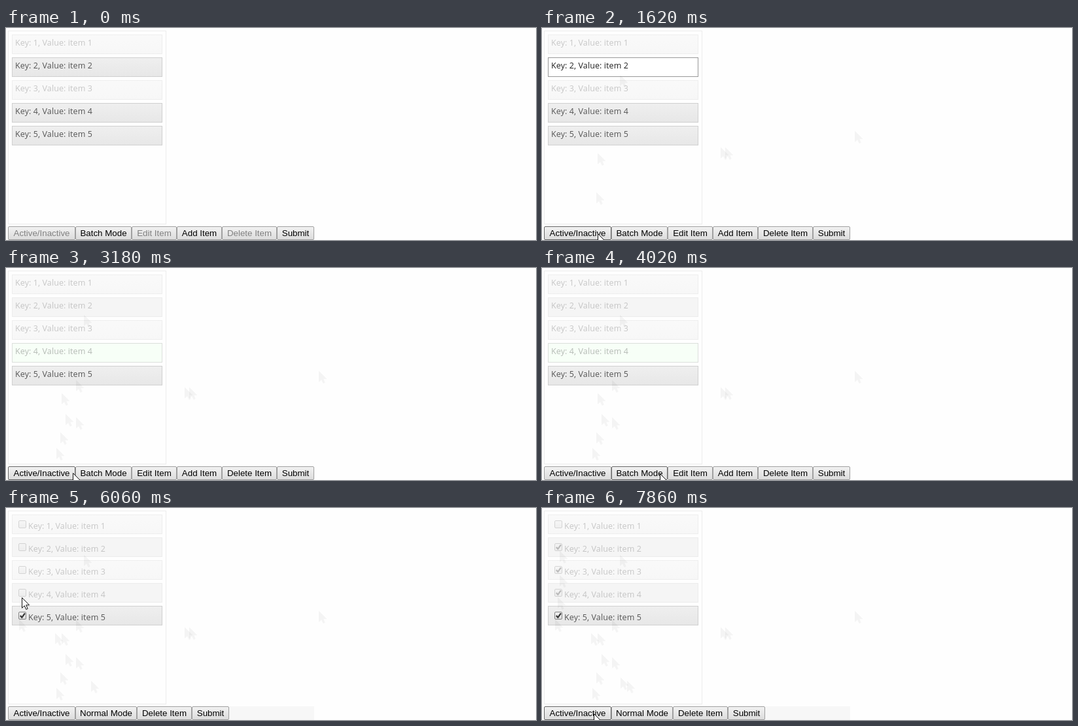
Animation, 810 px wide and 325 px high, one loop 8000 ms. Source, as an HTML page:

```html
<!DOCTYPE html>
<html lang="en">
<head>
<meta charset="utf-8">
<title>Item list</title>
<style>
  html, body { margin: 0; width: 100%; height: 100%; overflow: hidden; background: #fefefe; }
  svg { display: block; width: 810px; height: 325px; }
  .item { font: 12.5px "Open Sans", sans-serif; letter-spacing: .1px; }
  .label { font: 13.333px "Liberation Sans", Arial, sans-serif; text-anchor: middle; }
</style>
</head>
<body>
<svg viewBox="0 0 810 325">
  <defs>
    <linearGradient id="row" x2="0" y2="1">
      <stop stop-color="#efefef"/><stop offset="1" stop-color="#e7e7e7"/>
    </linearGradient>
    <linearGradient id="btn" x2="0" y2="1">
      <stop stop-color="#f2f2f2"/><stop offset="1" stop-color="#dcdcdc"/>
    </linearGradient>
    <path id="arrow" d="M.5 .5V16.3L4.2 12.8L6.8 18.5L9.2 17.4L6.7 11.8H11.6Z"/>
    <path id="beam" d="M-3 -7.5H3M0 -7V7M-3 7.5H3"/>
  </defs>
  <rect x="3.5" y="4.5" width="241" height="296" fill="#fefefe" stroke="#ececec"/>
  <g id="scene"></g>
</svg>
<script>
const LOOP = 8000, STEP = 60;
const PICK = 1080, BATCH = 4980, CHECKED = 5760;

// Pointer stops: time, x, y, rest
const path = [
  [120, 478, 158], [180, 280, 183, 120], [360, 273, 183], [840, 119, 72], [900, 124, 62, 180],
  [1260, 85, 192], [1320, 83, 252], [1440, 85, 315, 360], [2040, 107, 229], [2280, 118, 133, 240],
  [2640, 107, 172], [2700, 91, 224], [2760, 77, 276], [2880, 85, 315, 240], [3240, 118, 312],
  [3660, 222, 307], [4020, 180, 315, 960], [5160, 130, 265], [5220, 75, 192], [5340, 20, 171, 420],
  [6000, 24, 137, 240], [6420, 27, 103, 300], [6900, 27, 66, 180], [7260, 120, 260],
  [7500, 152, 302, 120], [7860, 79, 315]
];

const rows = [
  { off: 0 },
  { off: 1740, pick: PICK, drop: 2460, check: 7020 },
  { off: 0, check: 6480 },
  { off: 3060, pick: 2460, drop: BATCH, check: 6120, tint: "#f7fff7" },
  { off: LOOP, check: 5580 }
];

// Buttons: label, width, needs a selection
const normalBar = [
  ["Active/Inactive", 103, true], ["Batch Mode", 86], ["Edit Item", 69, true],
  ["Add Item", 69], ["Delete Item", 84, true], ["Submit", 57]
];
const batchBar = [
  ["Active/Inactive", 103, true], ["Normal Mode", 94], ["Delete Item", 84, true], ["Submit", 57]
];

const scene = document.getElementById("scene");
const box = (x, y, w, h, style) =>
  `<rect x="${x + .5}" y="${y + .5}" width="${w - 1}" height="${h - 1}" ${style}/>`;

function pointer(t) {
  const next = path.findIndex(k => k[0] > t);
  if (next === 0) return null;
  const [ta, xa, ya, rest = 0] = path.at(next < 0 ? -1 : next - 1);
  if (next < 0) return [xa, ya];
  const [tb, xb, yb] = path[next];
  const f = Math.max(0, (t - ta - rest) / (tb - ta - rest));
  return [Math.round(xa + (xb - xa) * f), Math.round(ya + (yb - ya) * f)];
}

function overText(x, y, batch) {
  const left = batch ? 35 : 15;
  const dy = (y - 10) % 35 - (batch ? 18 : 13);
  return y < 180 && x >= left && x <= left + 116 && Math.abs(dy) < 9;
}

function drawRow(row, i, t) {
  const y = 10 + 35 * i, n = i + 1, batch = t >= BATCH;
  const off = t >= row.off, picked = t >= row.pick && t < row.drop;
  const fill = picked ? row.tint || "#fff" : off && i % 2 ? "#dedede" : "url(#row)";
  // A picked row keeps its solid background while the rest fades
  const fade = off ? .3 : 1;
  let s = box(9, y, 230, 30, `fill="${fill}" opacity="${picked ? 1 : fade}"`);
  s += `<g opacity="${fade}">` + box(9, y, 230, 30, `fill="none" stroke="${picked ? "#999" : "#d0d0d0"}"`);
  if (batch) s += box(19, y + 9, 12, 12, 'rx="1.5" fill="url(#btn)" stroke="#858585"');
  if (t >= row.check) s += `<path d="M21.8 ${y + 15}l2.5 2.8l4.6 -6.4" fill="none" stroke="#333" stroke-width="2.2"/>`;
  return s + `<text class="item" x="${batch ? 34 : 14}" y="${y + (batch ? 22 : 17)}" fill="${picked ? "#212121" : "#555"}">Key: ${n}, Value: item ${n}</text></g>`;
}

function drawBar(t, pos) {
  const batch = t >= BATCH, ready = t >= (batch ? CHECKED : PICK);
  let x = 3;
  return (batch ? batchBar : normalBar).map(([label, w, locked]) => {
    const on = ready || !locked;
    const hover = on && pos && pos[0] >= x && pos[0] < x + w && pos[1] >= 304;
    const s = box(x, 304, w, 21, `rx="1.5" fill="url(#btn)" stroke="${hover ? "#666" : "#a0a0a0"}"`) +
      `<text class="label" x="${x + w / 2}" y="319" fill="${on ? "#000" : "#808080"}">${label}</text>`;
    x += w;
    return s;
  }).join("");
}

function drawTrail(t) {
  return path
    .filter(([at, x, y]) => t >= at + STEP && y < 300 && !overText(x, y, at >= BATCH))
    .map(([, x, y]) => `<use href="#arrow" x="${x}" y="${y}" stroke="#000" opacity=".035"/>`)
    .join("");
}

function drawPointer([x, y], batch) {
  return overText(x, y, batch)
    ? `<use href="#beam" x="${x}" y="${y}" fill="none" stroke="#111"/>`
    : `<use href="#arrow" x="${x}" y="${y}" fill="#fff" stroke="#111"/>`;
}

function render(t) {
  const pos = pointer(t), batch = t >= BATCH;
  let s = rows.map((row, i) => drawRow(row, i, t)).join("");
  if (batch) s += '<rect x="341" y="304" width="130" height="21" fill="#f7f7f7"/>';
  s += drawTrail(t) + drawBar(t, pos);
  if (pos) s += drawPointer(pos, batch);
  scene.innerHTML = s;
}

const start = performance.now();
let last = -1;
function tick() {
  const t = Math.floor((performance.now() - start) % LOOP / STEP) * STEP;
  if (t !== last) render(last = t);
  requestAnimationFrame(tick);
}
tick();
</script>
</body>
</html>
```
